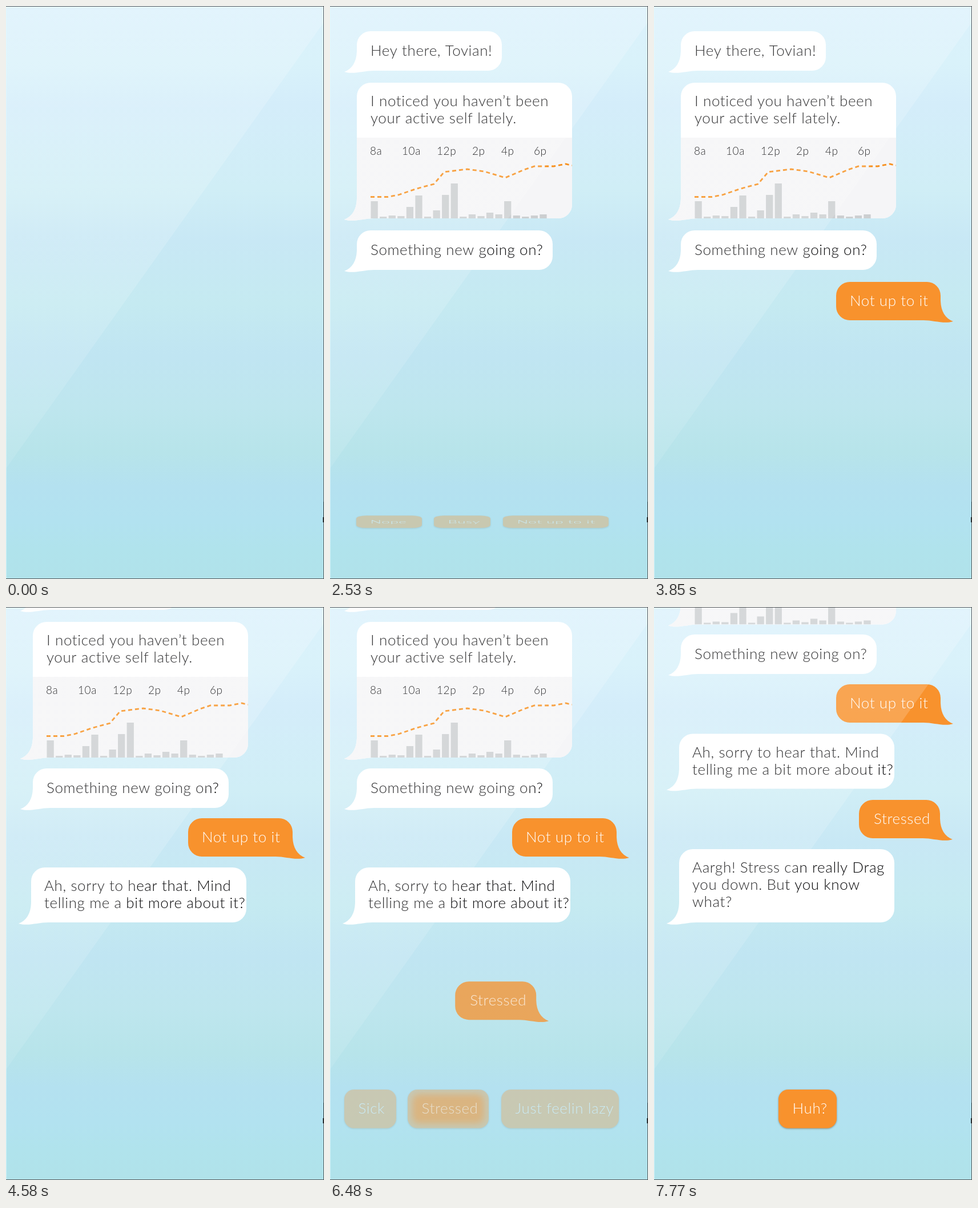
Animation, 557 px wide and 1001 px high, one loop 8 s. Source, as an HTML page with a canvas:

```html
<!DOCTYPE html>
<html lang="en">
<head>
<meta charset="utf-8">
<title>Chat</title>
<style>
  html, body { margin: 0; width: 100%; height: 100%; overflow: hidden; }
  canvas { display: block; width: 557px; height: 1001px; }
</style>
</head>
<body>
<canvas id="stage" width="557" height="1001"></canvas>
<script>
const W = 557, H = 1001, LOOP = 8000, STEP = 30;
const ORANGE = '#f8922d', INK = '#08080a';
const FONT = 'Lato, "Open Sans", sans-serif';

const stage = document.getElementById('stage');
const layerCanvas = document.createElement('canvas');
layerCanvas.width = W;
layerCanvas.height = H;
const ctx = stage.getContext('2d');
const layer = layerCanvas.getContext('2d');

const clamp = v => Math.max(0, Math.min(1, v));
const mix = (a, b, p) => a + (b - a) * p;
const smooth = v => { v = clamp(v); return v * v * (3 - 2 * v); };

// Progress through a span, moving in the steps of the animation clock.
const progress = (t, start, dur) => clamp(Math.floor((t - start) / STEP + 0.01) * STEP / dur);

// Growth with an overshoot: small, past full size, then settled.
function popScale(u, over) {
  const peak = 2 / 3;
  return u <= peak
    ? mix(0.32, over, Math.sin(u / peak * Math.PI / 2))
    : mix(over, 1, smooth((u - peak) / (1 - peak)));
}
const popAlpha = u => clamp(0.32 + u * 1.4);

// ys: place before the first scroll, after it, and after the second.
const messages = [
  { x: 47, w: 254, h: 69, ys: [44, -64, -298], at: 30, dur: 180, over: 1.088,
    lines: ['Hey there, Tovian!'], base: 43, pad: 24 },
  { x: 47, w: 377, h: 237, ys: [134, 26, -206.5], at: 740, dur: 180, over: 1.053,
    lines: ['I noticed you haven’t been', 'your active self lately.'], base: 41, pad: 24, chart: true },
  { x: 47, w: 343, h: 69, ys: [392, 282, 48], at: 1480, dur: 180, over: 1.088,
    lines: ['Something new going on?'], base: 43, pad: 24 },
  { x: 44, w: 377, h: 96, ys: [455, 455, 221.5], at: 4400, dur: 180, over: 1.05,
    lines: ['Ah, sorry to hear that. Mind', 'telling me a bit more about it?'], base: 41, pad: 23 },
  { x: 44, w: 377, h: 128, ys: [423, 423, 423], at: 6920, dur: 240, over: 1.05,
    lines: ['Aargh! Stress can really Drag', 'you down. But you know', 'what?'], base: 41, pad: 23 }
];

const replies = [
  { x: 319, w: 183, ys: [482, 369, 135], at: 3450, from: [303, 844], pad: 24, text: 'Not up to it' },
  { x: 359, w: 142, ys: [337, 337, 337], at: 6230, from: [136, 843], pad: 26, text: 'Stressed' }
];

const choices = [
  { at: 2530, dur: 150, over: 1.29, y: 844, gone: 3450, picked: 2,
    items: [[46, 115, 'Nope'], [182, 99, 'Busy'], [303, 185, 'Not up to it']] },
  { at: 5210, dur: 180, over: 1.14, y: 843, gone: 6230, picked: 1,
    items: [[25, 91, 'Sick'], [136, 142, 'Stressed'], [300, 206, 'Just feelin lazy']] },
  { at: 7560, dur: 210, over: 1.14, y: 843, gone: Infinity, picked: -1,
    items: [[218, 102, 'Huh?']] }
];

const MOVE = 390;
const barHeights = [30, 3, 5, 4, 20, 40, 3, 14, 41, 61, 3, 7, 4, 10, 7, 30, 5, 3, 5, 7];
const trend = [[24, 199.5], [54, 199.5], [73, 196], [105, 185], [135, 177], [153, 156], [193, 151],
  [223, 155], [260, 166], [293, 152], [311, 146], [345, 146], [366, 142], [377, 144.5]];
const hours = [[23, '8a'], [79, '10a'], [140, '12p'], [202, '2p'], [253, '4p'], [310, '6p']];

function verticalGradient(stops, height) {
  const g = ctx.createLinearGradient(0, 0, 0, height);
  stops.forEach(([y, color]) => g.addColorStop(y / height, color));
  return g;
}
const sky = verticalGradient([[0, '#dbf1fc'], [100, '#d9f2fa'], [170, '#d4edfa'], [320, '#d0eef6'],
  [410, '#c8e8f5'], [520, '#c5eaf1'], [610, '#c0e5f2'], [700, '#bee6ee'], [780, '#b7e4ea'],
  [840, '#b4e1f0'], [900, '#b2e2f0'], [950, '#b0e3ec'], [1001, '#b0e2ea']], H);
const sheen = verticalGradient([[0, 'rgba(255,255,255,.19)'], [500, 'rgba(255,255,255,.15)'],
  [808, 'rgba(255,255,255,.09)']], 808);

function write(g, text, x, y, color, size = 26) {
  g.font = `300 ${size}px ${FONT}`;
  g.letterSpacing = '0.6px';
  g.fillStyle = color;
  g.fillText(text, x, y);
}

// Bubble outline from its own top left corner, tail at the lower left.
function bubblePath(w, h) {
  const r = 24;
  ctx.beginPath();
  ctx.moveTo(0, h - 34);
  ctx.arcTo(0, 0, r, 0, r);
  ctx.arcTo(w, 0, w, r, r);
  ctx.arcTo(w, h, w - r, h, r);
  ctx.lineTo(30, h);
  ctx.bezierCurveTo(12, h, -6, h + 7, -22, h + 2);
  ctx.quadraticCurveTo(-1, h - 6, 0, h - 34);
  ctx.closePath();
}

function drawChart(w, h) {
  ctx.save();
  bubblePath(w, h);
  ctx.clip();
  ctx.fillStyle = '#f5f5f7';
  ctx.fillRect(-30, 96, w + 30, h);
  ctx.fillStyle = '#cccfd1';
  barHeights.forEach((b, i) => ctx.fillRect(24.5 + i * 15.57, h - b, 12.3, b));
  ctx.strokeStyle = '#f7901e';
  ctx.lineWidth = 2.8;
  ctx.setLineDash([7, 5]);
  ctx.beginPath();
  trend.forEach(([x, y]) => ctx.lineTo(x, y));
  ctx.stroke();
  ctx.restore();
  hours.forEach(([x, label]) => write(ctx, label, x, 125.5, INK, 19));
}

function drawMessage(m, y, t) {
  if (t < m.at) return;
  const u = progress(t, m.at, m.dur);
  ctx.save();
  ctx.globalAlpha = popAlpha(u);
  ctx.translate(27, y);
  ctx.scale(popScale(u, m.over), 1);
  ctx.translate(m.x - 27, 0);
  bubblePath(m.w, m.h);
  ctx.fillStyle = '#fff';
  ctx.fill();
  if (m.chart) drawChart(m.w, m.h);
  m.lines.forEach((line, i) => write(ctx, line, m.pad, m.base + i * 30, INK));
  ctx.restore();
}

function drawReply(r, y, t) {
  if (t < r.at) return;
  const u = progress(t, r.at, MOVE);
  const p = smooth((u - 0.343) / 0.657);
  ctx.save();
  ctx.globalAlpha = clamp((u - 0.2) / 0.55);
  ctx.translate(mix(r.from[0], r.x, p), mix(r.from[1], y, p));
  ctx.save();
  ctx.translate(r.w, 0);
  ctx.scale(-1, 1);
  bubblePath(r.w, 67);
  ctx.restore();
  ctx.fillStyle = ORANGE;
  ctx.fill();
  write(ctx, r.text, r.pad, 41.5, '#fff');
  ctx.restore();
}

function buttonPath(g, x, w, inset = 0) {
  g.beginPath();
  g.roundRect(x + inset, inset, w - inset * 2, 67.5 - inset * 2, 17 - inset / 2);
}

function drawButton(g, x, w, label) {
  g.save();
  g.shadowColor = 'rgba(60,50,40,.45)';
  g.shadowBlur = 3;
  g.shadowOffsetY = 1;
  g.fillStyle = ORANGE;
  buttonPath(g, x, w);
  g.fill();
  g.restore();
  write(g, label, x + 24.5, 42, '#fff');
}

// The pressed button keeps a soft light inside while it fades.
function drawGlow(x, w, label, alpha) {
  ctx.save();
  ctx.globalAlpha = alpha;
  buttonPath(ctx, x, w);
  ctx.clip();
  ctx.filter = 'blur(6px)';
  ctx.fillStyle = ORANGE;
  buttonPath(ctx, x, w, 8);
  ctx.fill();
  ctx.filter = 'none';
  write(ctx, label, x + 24.5, 42, '#fff');
  ctx.restore();
}

function drawChoices(c, t) {
  if (t < c.at || t >= c.gone + MOVE) return;
  const u = progress(t, c.at, c.dur);
  const out = t < c.gone ? 0 : progress(t + STEP, c.gone, MOVE);

  // Buttons fade as one group, so shadow and text do not show through.
  layer.clearRect(0, 0, W, H);
  layer.save();
  layer.translate(0, 912);
  layer.scale(1, popScale(u, c.over));
  layer.translate(0, c.y - 912);
  c.items.forEach(item => drawButton(layer, ...item));
  layer.restore();

  ctx.save();
  ctx.globalAlpha = popAlpha(u) * (1 - out);
  ctx.drawImage(layerCanvas, 0, 0);
  ctx.translate(0, c.y);
  if (out > 0 && c.picked >= 0) drawGlow(...c.items[c.picked], 0.4 * Math.min(1, 3 * (1 - out)));
  ctx.restore();
}

function drawSheen() {
  ctx.fillStyle = sheen;
  ctx.beginPath();
  ctx.moveTo(0, 0);
  ctx.lineTo(W, 0);
  ctx.lineTo(W, 28);
  ctx.lineTo(0, 808);
  ctx.fill();
}

function drawEdges() {
  ctx.fillStyle = 'rgba(225,250,255,.6)';
  ctx.fillRect(0, 0, 1, H);
  ctx.fillStyle = '#55595b';
  ctx.fillRect(0, 0, W, 1);
  ctx.fillRect(W - 1, 0, 1, H);
  ctx.fillRect(0, H - 1, W, 1);
  ctx.fillStyle = '#2b2f31';
  ctx.fillRect(W - 2, 893, 1, 9);
  ctx.fillRect(W - 1, 866, 1, 36);
}

function draw(t) {
  const first = t < 4310 ? 0 : smooth(progress(t + STEP, 4310, 120));
  const second = t < 6480 ? 0 : smooth(progress(t, 6480, 150));
  const place = m => mix(mix(m.ys[0], m.ys[1], first), m.ys[2], second);

  ctx.fillStyle = sky;
  ctx.fillRect(0, 0, W, H);
  messages.forEach(m => drawMessage(m, place(m), t));
  choices.forEach(c => drawChoices(c, t));
  replies.forEach(r => drawReply(r, place(r), t));
  drawSheen();
  drawEdges();
}

const start = performance.now();
function tick() {
  draw((performance.now() - start) % LOOP);
  requestAnimationFrame(tick);
}
tick();
</script>
</body>
</html>
```
